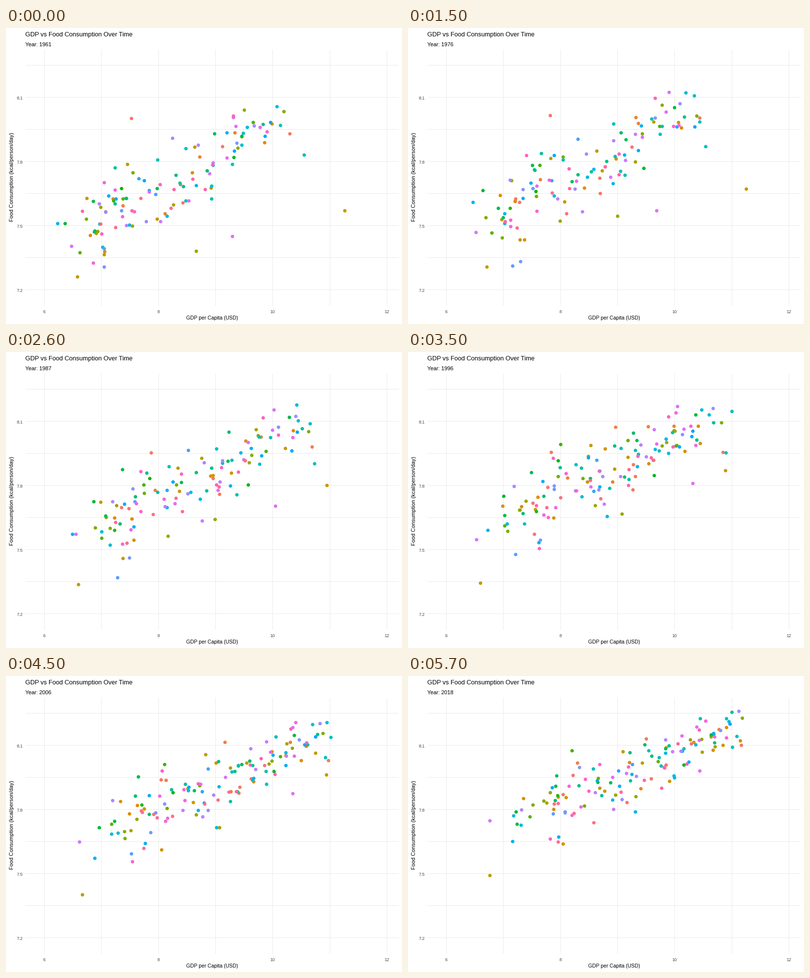
A matplotlib script for the animation above (5.8 s loop, 800 px wide and 600 px high).

```python
import numpy as np
import matplotlib.pyplot as plt
from matplotlib.animation import FuncAnimation

W, H, DPI = 800, 600, 100
YEARS, FIRST = 58, 1961
CROWD, LATE, LATE_YEAR = 134, 14, 31
FONT = "Liberation Sans"
GRID, TICK = "#EBEBEB", "#4D4D4D"
S = np.linspace(0, 1, YEARS)
rng = np.random.default_rng(7)

# Outlying countries: hue, then (GDP, food) in the first and the last year.
OUTLIERS = [
    (62, (11.26, 7.57), (11.15, 8.12)),
    (195, (10.55, 7.83), (11.01, 8.09)),
    (20, (10.30, 7.93), (11.17, 8.10)),
    (300, (9.29, 7.45), (10.44, 7.98)),
    (230, (6.23, 7.51), (7.16, 7.65)),
    (95, (8.66, 7.38), (9.32, 7.86)),
    (72, (6.58, 7.26), (6.76, 7.49)),
    (18, (7.53, 8.00), (8.05, 7.87)),
]


def stage_x(gdp):
    return np.round(77 + 115.35 * (gdp - 6)) + 0.5


def stage_y(food):
    return np.round(140 + 1300 / 3 * (8.1 - food)) + 0.5


def hcl(hue, light=65, chroma=100):
    """Polar LUV colour as sRGB."""
    a = np.radians(hue)
    u = chroma * np.cos(a) / (13 * light) + 0.1978
    v = chroma * np.sin(a) / (13 * light) + 0.4683
    y = ((light + 16) / 116) ** 3
    xyz = np.array([9 * y * u / (4 * v), y, y * (12 - 3 * u - 20 * v) / (4 * v)])
    rgb = np.array([(3.2405, -1.5371, -0.4985),
                    (-0.9693, 1.8760, 0.0416),
                    (0.0556, -0.2040, 1.0572)]) @ xyz
    rgb = np.clip(rgb, 0, 1)
    return np.where(rgb > 0.0031308, 1.055 * rgb ** (1 / 2.4) - 0.055, 12.92 * rgb)


def wander(n, keep=0.985):
    """Unit-variance autoregressive noise, one row per country."""
    out = rng.standard_normal((n, YEARS))
    for t in range(1, YEARS):
        out[:, t] = keep * out[:, t - 1] + np.sqrt(1 - keep ** 2) * out[:, t]
    return np.clip(out, -2.3, 2.3)


def outlier_paths():
    """Straight trends with noise that vanishes in the first and last year."""
    n = len(OUTLIERS)
    start = np.array([o[1] for o in OUTLIERS])[:, None]
    end = np.array([o[2] for o in OUTLIERS])[:, None]
    s = S[None, :, None]
    noise = np.stack([0.2 * wander(n), 0.06 * wander(n)], axis=-1)
    noise -= noise[:, :1] * (1 - s) + noise[:, -1:] * s
    return start + (end - start) * s + noise


def crowd_paths():
    """Both quantities grow; food rises with GDP and scatters less when rich."""
    rank = rng.permutation((np.arange(CROWD) + 0.5) / CROWD)[:, None]
    low, span = 6.75 + 0.45 * S, 3.2 + 0.7 * S
    gdp = low + span * rank ** (1.2 - 0.3 * S) + 0.22 * wander(CROWD)
    rich = gdp - 8
    trend = 7.64 + 0.18 * S + (0.16 - 0.045 * S) * rich
    spread = np.clip(0.105 - 0.02 * rich, 0.05, 0.11)
    food = np.minimum(trend + spread * wander(CROWD), 8.26)
    paths = np.stack([gdp, food], axis=-1)
    paths[:LATE, :LATE_YEAR] = np.nan
    return paths


paths = np.concatenate([outlier_paths(), crowd_paths()])
paths = np.stack([stage_x(paths[..., 0]), stage_y(paths[..., 1])], axis=-1)
hues = np.concatenate([[o[0] for o in OUTLIERS],
                       15 + 360 * np.arange(CROWD) / CROWD])
hues[-CROWD:] = rng.permutation(hues[-CROWD:])
order = np.argsort(hues, kind="stable")
paths, colors = paths[order], [hcl(h) for h in hues[order]]

fig = plt.figure(figsize=(W / DPI, H / DPI), dpi=DPI, facecolor="white")
ax = fig.add_axes([0, 0, 1, 1])
ax.set(xlim=(0, W), ylim=(H, 0))
ax.axis("off")


def label(x, y, text, px, **style):
    return ax.text(x, y, text, fontsize=px * 72 / DPI, family=FONT,
                   va="baseline", **style)


def line(xs, ys):
    ax.plot(xs, ys, color=GRID, lw=72 / DPI, snap=False,
            solid_capstyle="butt", zorder=1)


for gdp in range(6, 13):
    x = stage_x(gdp)
    line((x, x), (44, 563))
    if gdp % 2 == 0:
        label(x - 0.5, 578, str(gdp), 9, color=TICK, ha="center")
for i in range(8):
    food = 8.25 - 0.15 * i
    y = stage_y(food)
    line((39, 794), (y, y))
    if i % 2:
        label(34, y + 4.5, f"{food:.1f}", 9, color=TICK, ha="right")

label(39, 17, "GDP vs Food Consumption Over Time", 12.8)
year = label(39, 37, "", 11)
label(416.5, 591, "GDP per Capita (USD)", 10.4, ha="center")
label(15.5, 302, "Food Consumption (kcal/person/day)", 11, ha="center",
      rotation=90, rotation_mode="anchor")
dots = ax.scatter(paths[:, 0, 0], paths[:, 0, 1], s=(7 * 72 / DPI) ** 2,
                  c=colors, linewidths=0, zorder=3, plotnonfinite=True)


def draw(t):
    dots.set_offsets(paths[:, t])
    year.set_text(f"Year: {FIRST + t}")
    return dots, year


anim = FuncAnimation(fig, draw, frames=YEARS, interval=100, repeat=True,
                     repeat_delay=0, blit=False)
plt.show()
```
